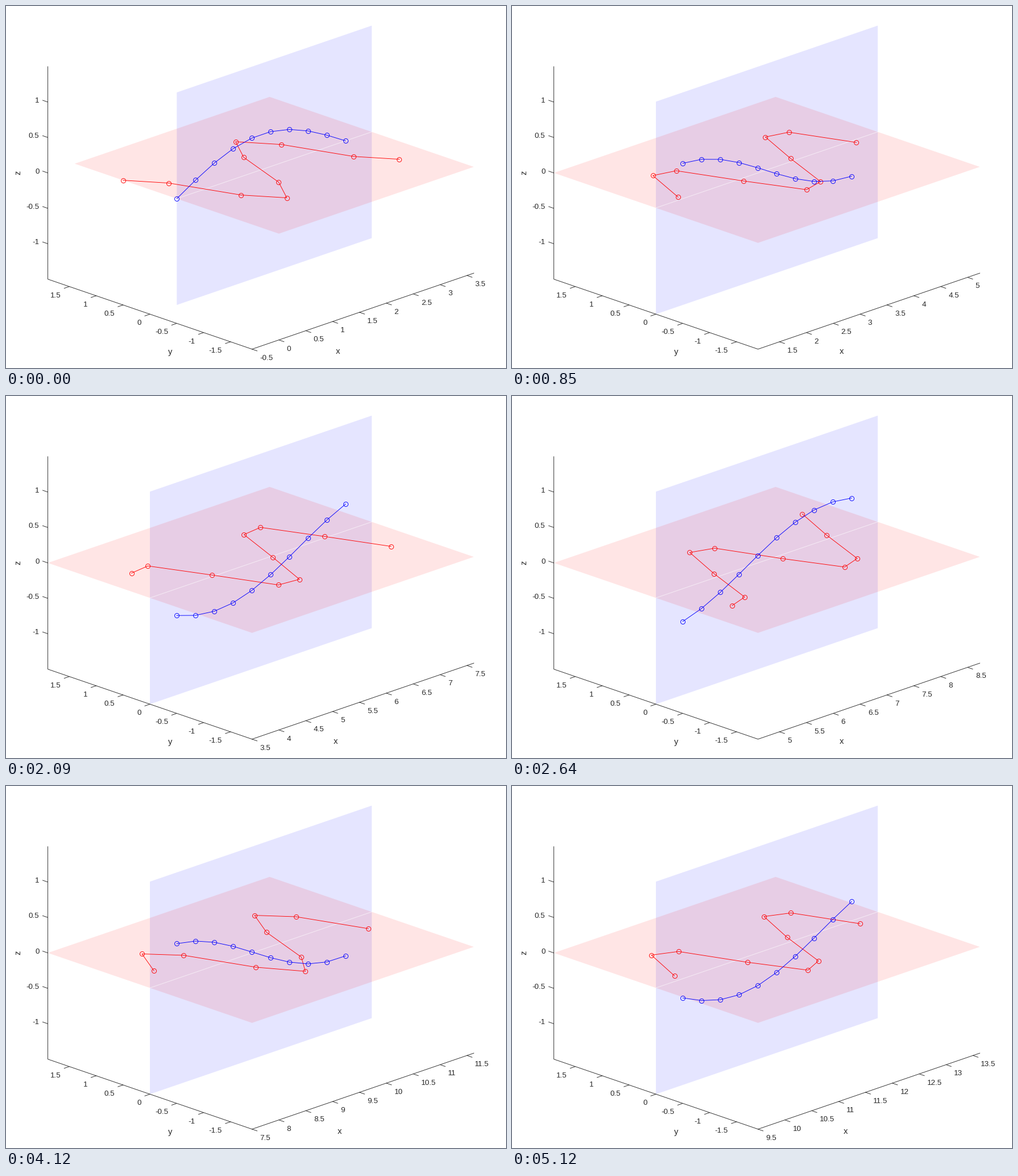
A matplotlib script that plays this animation: 879x637 px, repeating every 5190 ms.

```python
import math

import matplotlib.pyplot as plt
import numpy as np
from matplotlib.animation import FuncAnimation

W, H, DPI = 879, 637, 64           # a power of two keeps the pixel size exact
PX = 72 / DPI                      # one pixel in points
LOOP, TICK = 5190, 30              # ms
POSES, STEPS = 67, 100             # visible poses, sweep steps of 0.1

SCALE, RISE, ZSCALE = 94.47, 32.4, 124.67
Y_MAX, Z_MAX = 1.9, 1.5
SPAN, PAD = 4.128, 0.5
INK, RED, BLUE = "#262626", "#ff0000", "#0000ff"

plt.rcParams["font.family"] = "Liberation Sans"


def project(u, y, z):
    """Screen position; u is the distance from the lower x limit."""
    v = Y_MAX - y
    sx = 73 + SCALE * (u + v)
    sy = 480.2 + RISE * (v - u) - ZSCALE * (z + Z_MAX)
    return sx, sy


fig = plt.figure(figsize=(W / DPI, H / DPI), dpi=DPI, facecolor="white")
ax = fig.add_axes([0, 0, 1, 1])
ax.set_xlim(-0.5, W - 0.5)
ax.set_ylim(H - 0.5, -0.5)
ax.axis("off")


def stroke(xs=(), ys=(), color=INK, width=0.9, **kw):
    return ax.plot(xs, ys, color=color, lw=width * PX, **kw)[0]


def label(x, y, text, size=13.33, ha="left", **kw):
    kw.setdefault("va", "baseline")
    return ax.text(x, y, text, fontsize=size * PX, color=INK, ha=ha, **kw)


def tick_marks(points, dx, dy):
    xs, ys = [], []
    for x, y in points:
        xs += [x, x + dx, math.nan]
        ys += [y, y + dy, math.nan]
    return xs, ys


def quad(corners):
    return np.array([project(*c) for c in corners])


# Planes and the pale seam where they cross
blue_plane = ax.fill([0, 0, 0, 0], [0, 0, 0, 0], color=BLUE, alpha=0.1, lw=0, zorder=1)[0]
red_plane = ax.fill([0, 0, 0, 0], [0, 0, 0, 0], color=RED, alpha=0.1, lw=0, zorder=1.1)[0]
seam = stroke(color="white", width=1, alpha=0.6, zorder=1.2)

# Fixed axes
frame = [(0, Y_MAX, Z_MAX), (0, Y_MAX, -Z_MAX), (0, -Y_MAX, -Z_MAX), (SPAN, -Y_MAX, -Z_MAX)]
stroke(*zip(*(project(*p) for p in frame)), solid_joinstyle="miter")

z_vals = np.arange(-1, 1.1, 0.5)
z_pts = [project(0, Y_MAX, z) for z in z_vals]
stroke(*tick_marks(z_pts, -9, -3.1))
for val, (x, y) in zip(z_vals, z_pts):
    label(58, y + 1, f"{val:g}", ha="right")

y_vals = np.arange(-1.5, 1.6, 0.5)
y_pts = [project(0, y, -Z_MAX) for y in y_vals]
stroke(*tick_marks(y_pts, -9, 3.1))
for val, (x, y) in zip(y_vals, y_pts):
    label(x - 15, y + 19, f"{val:g}", ha="right")

label(288, 613, "y", 14.67, "center")
label(21, 293, "z", 14.67, "center", va="center", rotation=90)
x_title = label(579, 612, "x", 14.67, "center")

# Moving parts
x_ticks = stroke()
x_labels = [label(0, 0, "") for _ in range(9)]
rings = dict(marker="o", ms=8 * PX, mfc="none", mew=0.9 * PX)
red_wave = stroke(color=RED, zorder=3, **rings)
blue_wave = stroke(color=BLUE, zorder=3.1, **rings)
offsets = np.linspace(0, math.pi, 10)


def draw_x_axis(low):
    first = math.ceil(low * 2 - 1e-6)
    last = math.floor((low + SPAN) * 2 + 1e-6)
    vals = [n / 2 for n in range(first, last + 1)]
    points = [project(v - low, -Y_MAX, -Z_MAX) for v in vals]
    x_ticks.set_data(*tick_marks(points, 9, 3.1))
    for item in x_labels:
        item.set_text("")
    for item, val, (x, y) in zip(x_labels, vals, points):
        item.set_text(f"{val:g}")
        item.set_position((x + 14, y + 19))
    # The title gives way to the widest tick label
    x_title.set_x(583 if vals[0] < 0 else 586 if vals[-1] > 10 else 579)


def update(k):
    pose = min(POSES - 1, int((k * TICK + 25) * POSES / LOOP))
    start = pose * STEPS // (POSES - 1) / 10
    low = start - PAD
    draw_x_axis(low)

    near = max(0, -low)
    blue_plane.set_xy(quad([(near, 0, Z_MAX), (SPAN, 0, Z_MAX),
                            (SPAN, 0, -Z_MAX), (near, 0, -Z_MAX)]))
    red_plane.set_xy(quad([(near, Y_MAX, 0), (SPAN, Y_MAX, 0),
                           (SPAN, -Y_MAX, 0), (near, -Y_MAX, 0)]))
    seam.set_data(*zip(project(near, 0, 0), project(SPAN, 0, 0)))

    x = start + offsets
    red_wave.set_data(*project(x - low, np.cos(3 * x), 0))
    blue_wave.set_data(*project(x - low, 0, 0.5 * np.sin(x)))
    return []


anim = FuncAnimation(fig, update, frames=LOOP // TICK, interval=TICK,
                     init_func=lambda: update(0), repeat=True, repeat_delay=0)
plt.show()
```
